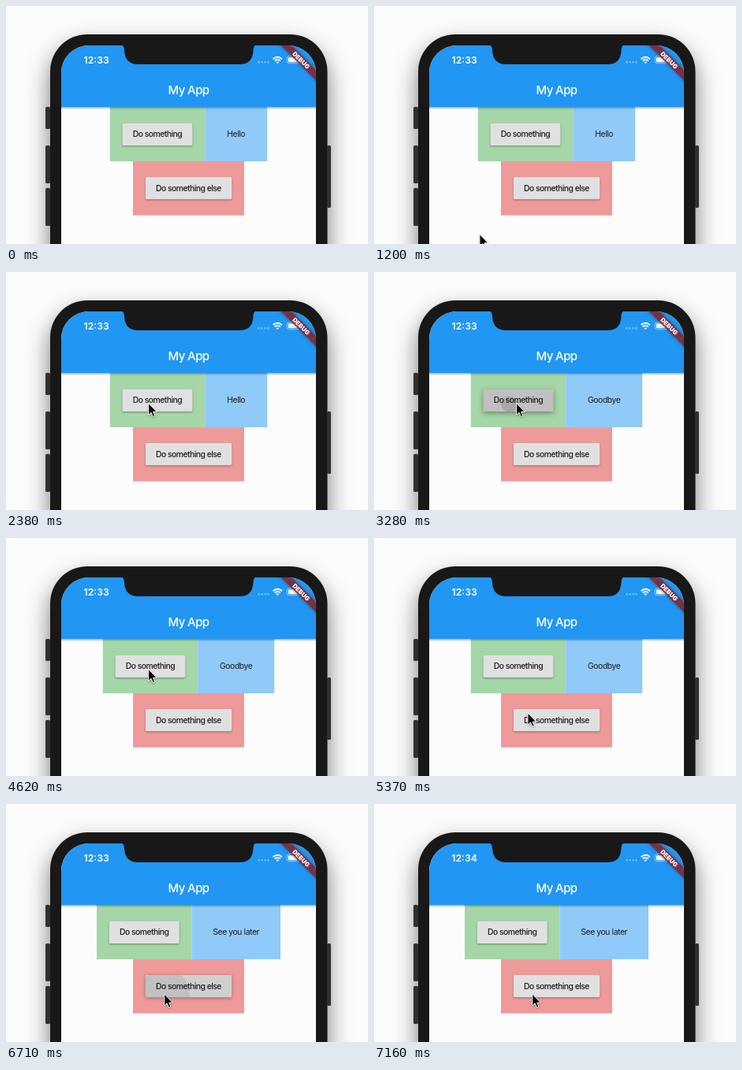
Write an HTML page that moves like this. It is 459 px wide and 302 px high and loops after 8000 ms.

```html
<!DOCTYPE html>
<html lang="en">
<head>
<meta charset="utf-8">
<title>My App</title>
<style>
  html, body { margin: 0; width: 100%; height: 100%; overflow: hidden; background: #fcfcfc; }
  svg { display: block; width: 459px; height: 302px; }
  text { font-family: Inter, "Open Sans", sans-serif; text-anchor: middle; }
  .label { font-size: 10.4px; letter-spacing: -.04em; fill: #1b1b1b; }
  .button .label { font-weight: 500; letter-spacing: -.052em; }
  .title { font-size: 15px; font-weight: 500; letter-spacing: -.04em; fill: #fff; }
  .clock { font-size: 12.2px; font-weight: 600; fill: #fff; }
  .debug { font-size: 7.8px; font-weight: 900; fill: #fff; }
  .body { fill: #181818; filter: drop-shadow(0 14px 15px rgba(0, 0, 0, .52)); }
  .bar { fill: #2196f3; filter: drop-shadow(0 1px 1.5px rgba(0, 0, 0, .45)); }
  .side { fill: #303030; }
</style>
</head>
<body>
<svg viewBox="0 0 459 302">
  <defs>
    <clipPath id="screen"><rect x="70" y="50" width="323" height="700" rx="35"/></clipPath>
    <clipPath id="clip1"><rect width="89" height="28.2" rx="1.6"/></clipPath>
    <clipPath id="clip2"><rect width="109.5" height="28.2" rx="1.6"/></clipPath>
  </defs>

  <rect class="body" x="56" y="36" width="351.5" height="720" rx="47"/>
  <g class="side">
    <rect x="50" y="128" width="6" height="28" rx="1.5"/>
    <rect x="50" y="177" width="6" height="48" rx="1.5"/>
    <rect x="50" y="231" width="6" height="48" rx="1.5"/>
    <rect x="407" y="177" width="5" height="79" rx="1.5"/>
  </g>

  <g clip-path="url(#screen)">
    <rect x="70" y="50" width="323" height="260" fill="#fcfcfc"/>
    <rect id="green" y="128" width="120.4" height="69" fill="#a5d6a7"/>
    <rect id="blue" y="128" height="69" fill="#90caf9"/>
    <rect x="161" y="197" width="141" height="68.7" fill="#ef9a9a"/>
    <text id="message" class="label" y="166.4"></text>

    <g id="button1" class="button">
      <rect class="face" width="89" height="28.2" rx="1.6" fill="#e0e0e0"/>
      <g clip-path="url(#clip1)"><circle class="ripple" cx="33" cy="19"/></g>
      <text class="label" x="44.5" y="17.6">Do something</text>
    </g>
    <g id="button2" class="button" transform="translate(176.8 217)">
      <rect class="face" width="109.5" height="28.2" rx="1.6" fill="#e0e0e0"/>
      <g clip-path="url(#clip2)"><circle class="ripple" cx="24" cy="24"/></g>
      <text class="label" x="54.7" y="17.8">Do something else</text>
    </g>

    <rect class="bar" x="60" y="40" width="343" height="88"/>
    <text class="title" x="231.5" y="112.3">My App</text>
    <text id="clock" class="clock" x="114.6" y="73"></text>

    <g fill="#fff" fill-opacity=".4">
      <circle cx="320.5" cy="71.2" r="1.2"/><circle cx="324.5" cy="71.2" r="1.2"/>
      <circle cx="328.5" cy="71.2" r="1.2"/><circle cx="332.5" cy="71.2" r="1.2"/>
    </g>
    <g fill="none" stroke="#fff" stroke-width="1.9">
      <path d="M338.6 67.2Q344.3 62.2 350 67.2M340.8 69.6Q344.3 66.5 347.8 69.6"/>
      <path d="M344.3 73.1L342.3 71.2Q344.3 69.6 346.3 71.2Z" fill="#fff" stroke="none"/>
    </g>
    <rect x="356.2" y="63.7" width="18.5" height="9" rx="2.5" fill="none" stroke="#fff" stroke-opacity=".55" stroke-width=".9"/>
    <rect x="357.8" y="65.2" width="15" height="6" rx="1.3" fill="#fff"/>

    <g transform="translate(393 50) rotate(45)">
      <rect x="-45" y="22" width="90" height="9.3" fill="#7c2f43" style="filter: drop-shadow(0 0 2px rgba(0, 0, 0, .4))"/>
      <text class="debug" y="29.4">DEBUG</text>
    </g>
  </g>

  <path d="M145 49H318.5Q313.5 50 313.5 56Q313 74 296 74H168Q150.500 74 150 56Q150 50 145 49Z" fill="#181818"/>
  <path id="cursor" d="M0 0V15.2L3.5 12L5.900 17.400L8.300 16.300L6 11.200H10.700Z" fill="#000" stroke="#fff" stroke-width="1"
        style="filter: drop-shadow(0 1px 1px rgba(0, 0, 0, .35))"/>
</svg>

<script>
  const LOOP = 8000, CENTER = 231.5, GREEN = 120.4;
  const $ = id => document.getElementById(id);
  const set = (el, attrs) => { for (const k in attrs) el.setAttribute(k, attrs[k]); };

  // Each row holds from its start time until the next row.
  const messages = [[0, 'Hello', 79], [3280, 'Goodbye', 97], [6560, 'See you later', 112.6]];
  const clocks = [[0, '12:33'], [7160, '12:34']];
  const pointer = [
    [0, -50, -50], [1200, 134, 289.5], [1350, 134.5, 287], [1490, 137, 277], [1640, 146, 249],
    [1790, 159, 207], [1930, 169, 174], [2080, 177, 168], [2230, 180.5, 166.3],
    [5070, 182, 173], [5220, 188, 199], [5370, 195, 222], [5510, 199.5, 238], [5660, 200.7, 241]
  ];
  // Offset from press, pressed amount, ripple radius, ripple opacity
  const press = [[-LOOP, 0, 0, 0], [0, .2, 4, .06], [150, 1, 10, .13], [290, .5, 32, .07], [440, 0, 0, 0]];

  const at = (rows, t) => rows.filter(row => row[0] <= t).pop();

  function drawButton(id, t) {
    const [, amount, radius, opacity] = at(press, t);
    const button = $(id), face = button.querySelector('.face');
    const shade = Math.round(224 - 32 * amount);
    face.style.fill = `rgb(${shade}, ${shade}, ${shade})`;
    face.style.filter = `drop-shadow(0 ${1 + 1.5 * amount}px ${.8 + 2.2 * amount}px rgba(0, 0, 0, .38))`;
    set(button.querySelector('.ripple'), { r: radius, 'fill-opacity': opacity });
  }

  function draw(t) {
    const [, message, width] = at(messages, t);
    const left = CENTER - (GREEN + width) / 2;
    set($('green'), { x: left });
    set($('blue'), { x: left + GREEN, width });
    set($('message'), { x: left + GREEN + width / 2 });
    set($('button1'), { transform: `translate(${left + 15.7} 148.800)` });
    $('message').textContent = message;
    $('clock').textContent = at(clocks, t)[1];
    drawButton('button1', t - 3130);
    drawButton('button2', t - 6410);
    const [, x, y] = at(pointer, t);
    set($('cursor'), { transform: `translate(${x} ${y})` });
  }

  const start = performance.now();
  function tick() {
    draw((performance.now() - start) % LOOP);
    requestAnimationFrame(tick);
  }
  tick();
</script>
</body>
</html>
```
